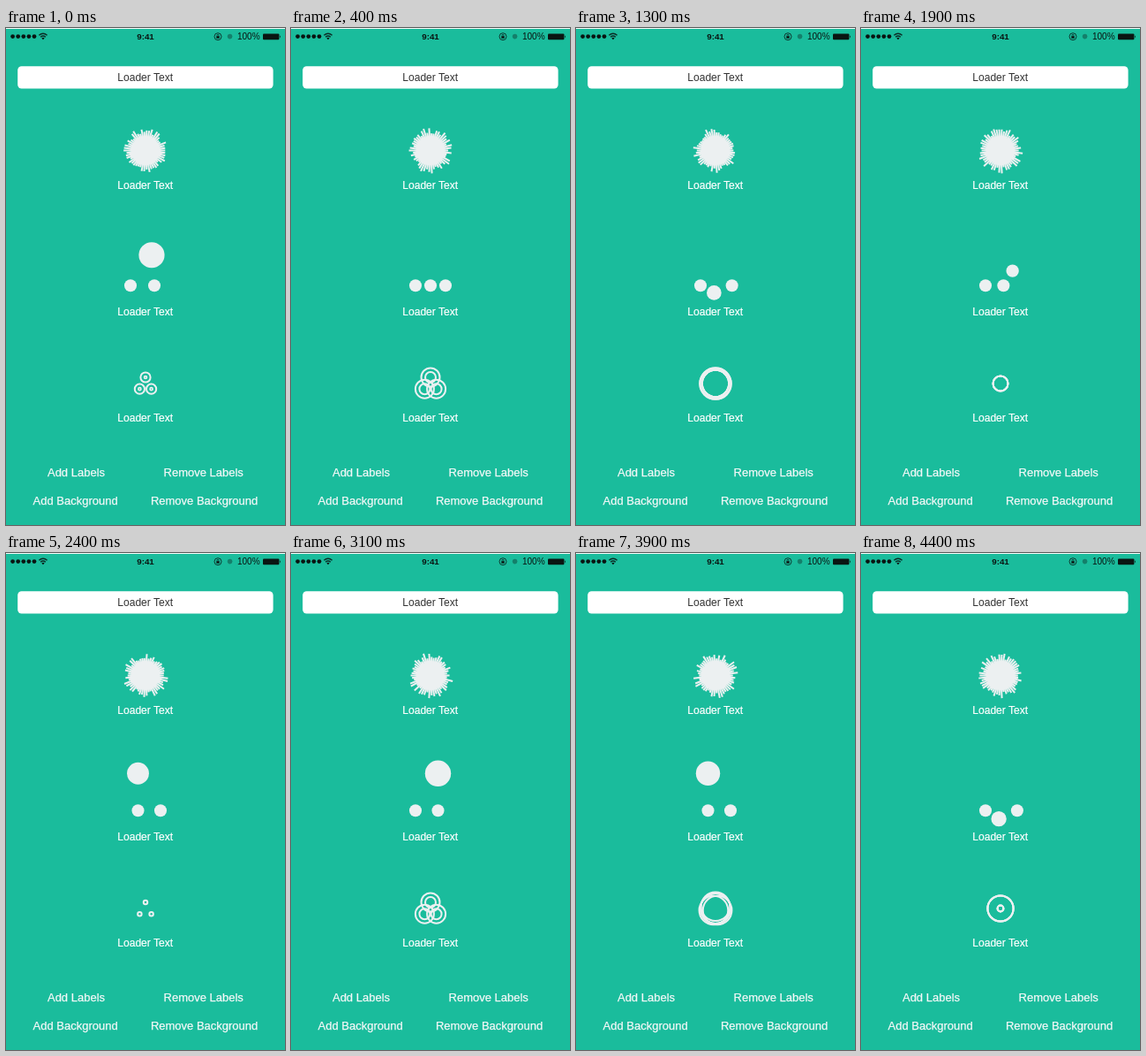
An HTML page for the animation above (4500 ms loop, 316 px wide and 562 px high).

```html
<!DOCTYPE html>
<html lang="en">
<head>
<meta charset="utf-8">
<title>Loaders</title>
<style>
  html, body { margin: 0; width: 100%; height: 100%; overflow: hidden; background: #1abc9c; }
  svg { display: block; width: 316px; height: 562px; font-family: "Liberation Sans", Arial, sans-serif; }
  .label { font-size: 12.1px; fill: #fff; stroke: #fff; stroke-width: .2; text-anchor: middle; }
  .button { font-size: 13px; fill: #f4f8f8; stroke: #f4f8f8; stroke-width: .25; text-anchor: middle; }
  .dark { fill: #333; stroke: none; }
  .light { fill: #ecf0f1; }
  .line { fill: none; stroke: #ecf0f1; }
  .thin { fill: none; stroke: #0c2b25; }
</style>
</head>
<body>
<svg viewBox="0 0 316 562">
  <rect width="316" height="562" fill="#1abc9c"/>
  <rect width="316" height="1" fill="#f4fbf9"/>

  <g id="status" fill="#0a1512">
    <g id="signal"></g>
    <g class="thin" stroke-width="1.5">
      <path d="M37.4 8.2Q42 4.2 46.6 8.2"/>
      <path d="M39.2 10.2Q42 7.8 44.8 10.2"/>
    </g>
    <path d="M40.4 11.4Q42 10.1 43.6 11.4L42 13.2Z"/>
    <text x="158" y="13.2" font-size="9.8" font-weight="bold" text-anchor="middle">9:41</text>
    <circle class="thin" cx="240" cy="9.7" r="4" stroke-width=".9"/>
    <rect x="238.3" y="9.2" width="3.4" height="2.5"/>
    <path class="thin" stroke-width=".8" d="M239 9.2V8.4a1 1 0 0 1 2 0V9.2"/>
    <circle cx="253.6" cy="9.6" r="2.8" fill="#14806b"/>
    <text x="262" y="13.2" font-size="10">100%</text>
    <rect x="291" y="6.4" width="18.4" height="6.8" rx="1"/>
    <path d="M310 8.2Q311.8 9.8 310 11.4Z"/>
  </g>

  <rect x="13.2" y="43.2" width="289.4" height="25.3" rx="4.5" fill="#fff"/>
  <text class="label dark" x="157.7" y="60">Loader Text</text>
  <text class="label" x="157.7" y="182">Loader Text</text>
  <text class="label" x="157.7" y="325.4">Loader Text</text>
  <text class="label" x="157.7" y="444.8">Loader Text</text>

  <text class="button" x="79.5" y="506.6">Add Labels</text>
  <text class="button" x="223.7" y="506.6">Remove Labels</text>
  <text class="button" x="78.6" y="538.6">Add Background</text>
  <text class="button" x="224.6" y="538.6">Remove Background</text>

  <path id="burst" class="line" stroke-width="2"/>
  <g id="balls"></g>
  <g id="rings"></g>
</svg>
<script>
  const LOOP = 4500, STEP = 100;
  const $ = id => document.getElementById(id);

  function circle(parent, cls, attrs = {}) {
    const node = document.createElementNS('http://www.w3.org/2000/svg', 'circle');
    if (cls) node.setAttribute('class', cls);
    set(node, attrs);
    return parent.appendChild(node);
  }

  function set(node, attrs) {
    for (const key in attrs) node.setAttribute(key, attrs[key]);
  }

  const mix = (a, b, k) => a + (b - a) * k;

  // Piecewise linear curve through [time, value] points.
  function curve(points, t) {
    if (t <= points[0][0]) return points[0][1];
    for (let i = 1; i < points.length; i++) {
      const [t0, v0] = points[i - 1], [t1, v1] = points[i];
      if (t <= t1) return mix(v0, v1, (t - t0) / (t1 - t0));
    }
    return points[points.length - 1][1];
  }

  function random(seed) {
    return () => {
      seed = (seed + 0x6D2B79F5) | 0;
      let n = Math.imul(seed ^ (seed >>> 15), 1 | seed);
      n = (n + Math.imul(n ^ (n >>> 7), 61 | n)) ^ n;
      return ((n ^ (n >>> 14)) >>> 0) / 4294967296;
    };
  }

  // Radial bars with new lengths at every step.
  const BARS = 50;
  function drawBurst(t) {
    const next = random(t * 7 + 11);
    let d = '';
    for (let i = 0; i < BARS; i++) {
      const angle = i / BARS * 2 * Math.PI;
      const length = mix(18.5, 26, next());
      d += `M158 138.5l${length * Math.cos(angle)} ${length * Math.sin(angle)}`;
    }
    $('burst').setAttribute('d', d);
  }

  // The middle ball is thrown right, then left, swapping with its neighbour.
  const THROW = 770, APEX = 12;
  const balls = [0, 1, 2].map(() => circle($('balls'), 'light', { cy: 291.3, r: 7 }));
  const windUp = u => u * u * (4 * u - 3);
  const drop = u => u ** 5;
  const swell = u => (1 - Math.abs(1 - u)) ** 1.7;

  function drawBalls(t) {
    const time = t - APEX + THROW / 2;
    const turn = Math.floor(time / THROW);
    const side = turn % 2 ? -1 : 1;
    const u = (time - turn * THROW) / THROW * 2;
    const way = u < 1 ? windUp(u) / 2 : 0.5 + drop(u - 1) / 2;
    const height = 84 * Math.min(way, 1 - way);
    set(balls[0], { cx: 158 - side * 17 });
    set(balls[1], { cx: 158 + side * 17 * (1 - way) });
    set(balls[2], { cx: 158 + side * 17 * way, cy: 291.3 - height, r: 7 + 8 * swell(u) });
  }

  // Two sets of three rings grow apart, merge in the middle and shrink.
  const PERIOD = 2700, START = -500, LAG = 370;
  const RADIUS = [[0, 0], [500, 5.6], [900, 10.5], [1300, 16], [1500, 18.3],
                  [1700, 17], [1830, 14.6], [2030, 8.5], [2200, 3.4], [2310, 0]];
  const SPREAD = [[950, 1], [1300, 0.4], [1450, 0]];
  const CORNERS = [[0, -7], [-6.6, 6.2], [6.6, 6.2]];
  const rings = [0, LAG].map(lag => ({ lag, nodes: CORNERS.map(() => circle($('rings'), 'line')) }));

  function drawRings(t) {
    for (const { lag, nodes } of rings) {
      const age = (t - START - lag + PERIOD) % PERIOD;
      const r = curve(RADIUS, age), spread = curve(SPREAD, age);
      nodes.forEach((node, i) => set(node, {
        cx: 158 + CORNERS[i][0] * spread,
        cy: 402 + CORNERS[i][1] * spread,
        r,
        'stroke-width': Math.min(2, r * 1.2)
      }));
    }
  }

  for (let i = 0; i < 5; i++) circle($('signal'), '', { cx: 7.6 + i * 6.1, cy: 9.6, r: 2.4 });

  const begin = performance.now();
  let shown = -1;
  function frame() {
    const t = Math.floor(((performance.now() - begin) % LOOP) / STEP) * STEP;
    if (t !== shown) {
      shown = t;
      drawBurst(t);
      drawBalls(t);
      drawRings(t);
    }
    requestAnimationFrame(frame);
  }
  frame();
</script>
</body>
</html>
```
